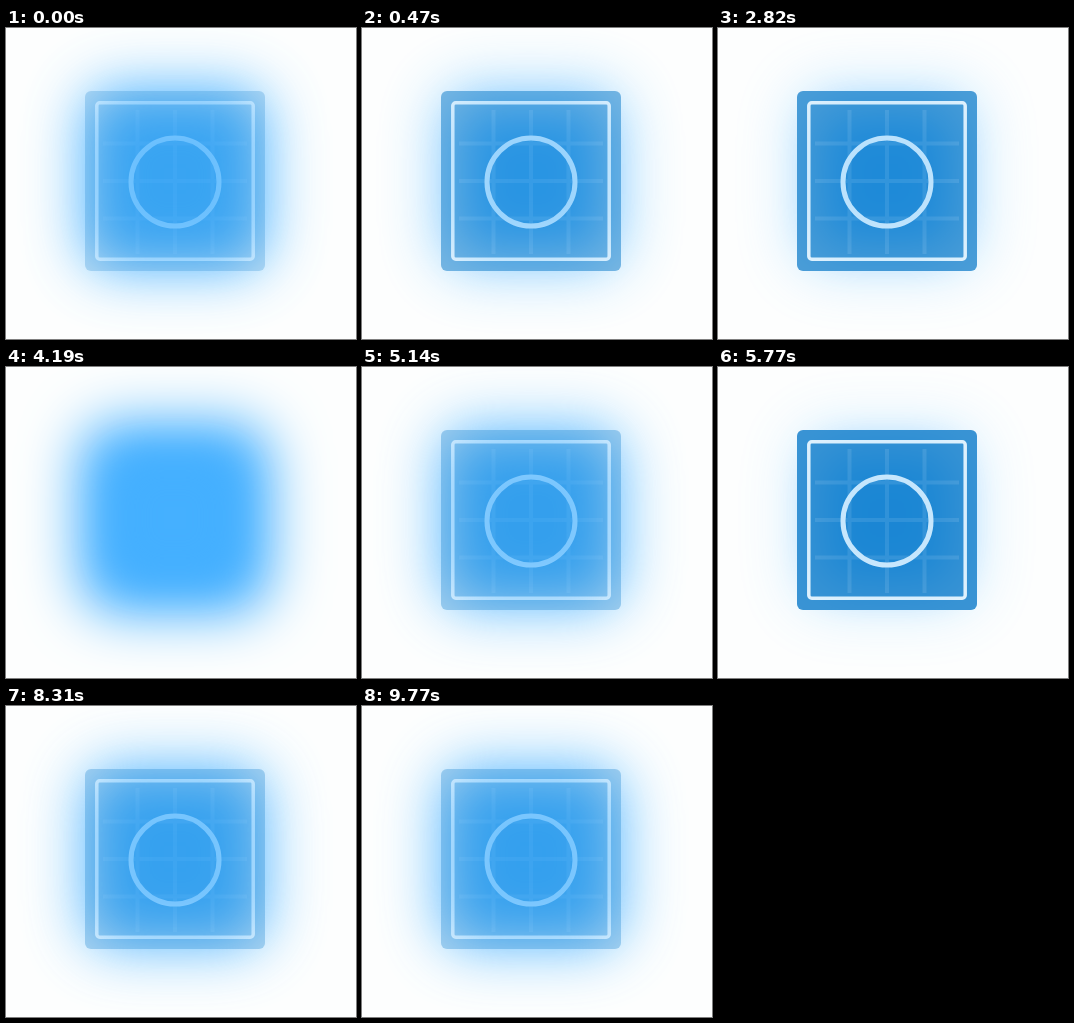
Recreate the animation shown at these times as an HTML page with a canvas. Size 350x311 px, loop 9.87 s.

```html
<!DOCTYPE html>
<html lang="en">
<head>
<meta charset="utf-8">
<title>Pulsing blueprint tile</title>
<style>
  html, body { margin: 0; width: 100%; height: 100%; overflow: hidden; background: #fdfefe; }
  canvas { display: block; }
</style>
</head>
<body>
<canvas id="stage" width="350" height="311"></canvas>
<script>
const WIDTH = 350, HEIGHT = 311, LOOP = 9870;
const CENTER = { x: 169, y: 153 };
const ctx = document.getElementById('stage').getContext('2d');

// Each fade: start, end, opacity it moves to.
const FADES = [
  [-750, 1600, 1],
  [2250, 3950, 0],
  [4400, 6300, 1],
  [7100, 9000, 0],
  [9100, 10900, 1]
];
// Spans in which the picture stands still.
const HOLDS = [[4190, 4640], [8780, 9580]];

function layer(paint) {
  const canvas = document.createElement('canvas');
  canvas.width = WIDTH;
  canvas.height = HEIGHT;
  paint(canvas.getContext('2d'));
  return canvas;
}

function roundBox(c, half, radius, x = CENTER.x, y = CENTER.y) {
  c.beginPath();
  c.roundRect(x - half, y - half, half * 2, half * 2, radius);
}

// Only the shadow of an off-stage box lands on the layer.
function softBox(half, radius, sigma) {
  return layer(c => {
    c.shadowColor = 'rgb(69,176,255)';
    c.shadowBlur = sigma * 2;
    c.shadowOffsetX = 1000;
    c.fillStyle = '#000';
    roundBox(c, half, radius, CENTER.x - 1000, CENTER.y - 2);
    c.fill();
  });
}

const halo = softBox(96, 40, 28);
const core = softBox(63, 20, 22);

const tile = layer(c => {
  c.fillStyle = 'rgb(18,126,203)';
  roundBox(c, 90, 6);
  c.fill();

  c.lineWidth = 4;
  c.strokeStyle = 'rgba(255,255,255,0.11)';
  c.beginPath();
  for (const d of [-37.5, 0, 37.5]) {
    c.moveTo(CENTER.x + d, CENTER.y - 71);
    c.lineTo(CENTER.x + d, CENTER.y + 73);
    c.moveTo(CENTER.x - 72, CENTER.y + d);
    c.lineTo(CENTER.x + 72, CENTER.y + d);
  }
  c.stroke();

  c.strokeStyle = 'rgb(222,241,253)';
  c.lineWidth = 3.5;
  roundBox(c, 78.2, 3);
  c.stroke();

  c.lineWidth = 5;
  c.beginPath();
  c.arc(CENTER.x, CENTER.y + 1, 44, 0, Math.PI * 2);
  c.stroke();
});

function tileOpacity(time) {
  const hold = HOLDS.find(([from, to]) => time >= from && time < to);
  const t = hold ? hold[0] : time;
  const [start, end, target] = FADES.filter(fade => fade[0] <= t).pop();
  const progress = Math.min((t - start) / (end - start), 1);
  const eased = (1 - Math.cos(Math.PI * progress)) / 2;
  return target ? eased : 1 - eased;
}

function drawLayer(image, alpha) {
  ctx.globalAlpha = alpha;
  ctx.drawImage(image, 0, 0);
}

function render() {
  const opacity = tileOpacity(performance.now() % LOOP);
  ctx.globalAlpha = 1;
  ctx.fillStyle = '#fdfefe';
  ctx.fillRect(0, 0, WIDTH, HEIGHT);
  drawLayer(halo, 1 - opacity);
  drawLayer(core, 1);
  drawLayer(tile, opacity);
  requestAnimationFrame(render);
}
render();
</script>
</body>
</html>
```
